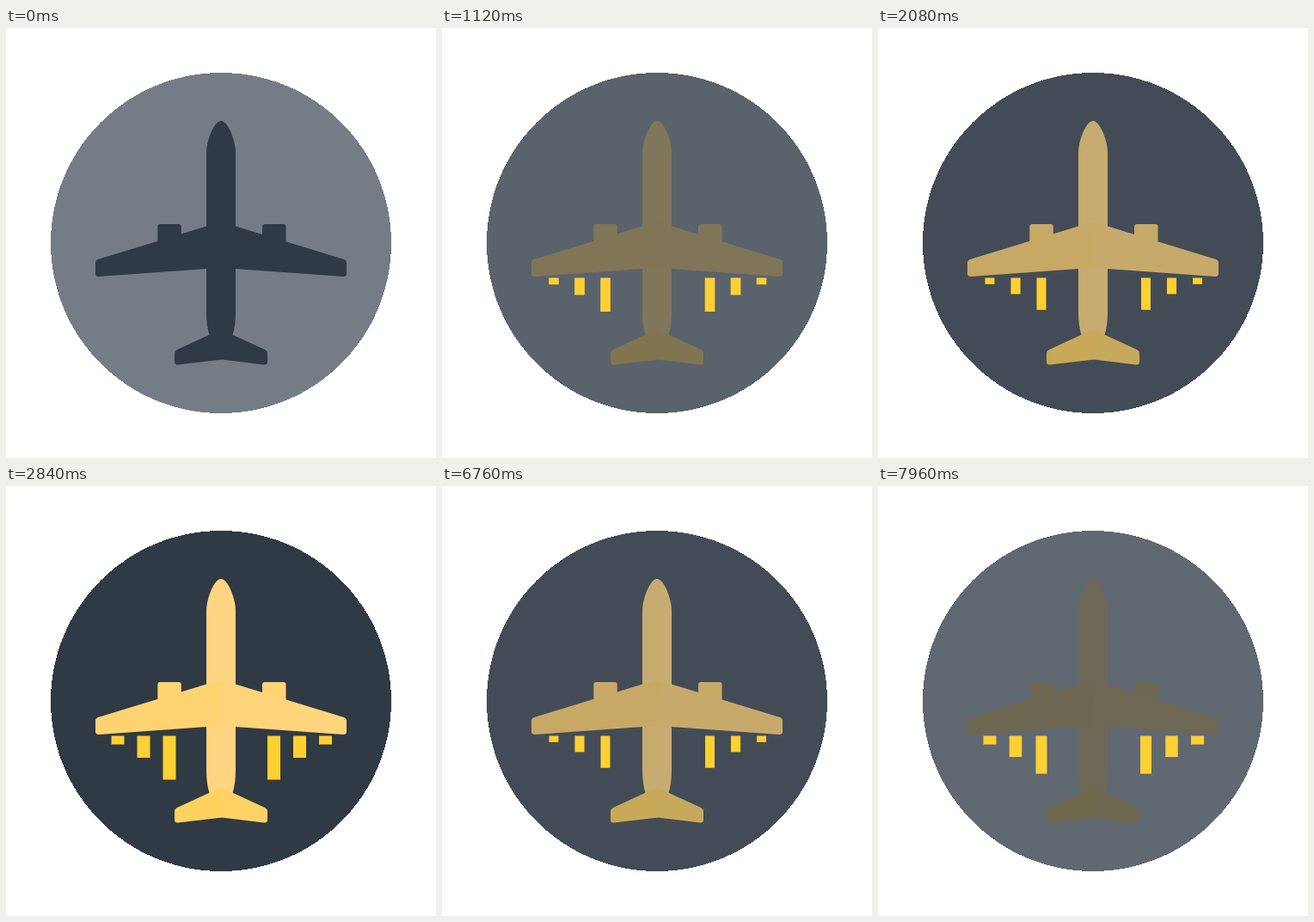
An HTML page for the animation above (8000 ms loop, 500 px wide and 500 px high).

```html
<!DOCTYPE html>
<html lang="en">
<head>
<meta charset="utf-8">
<title>Plane at night</title>
<style>
  html, body { margin: 0; width: 100%; height: 100%; overflow: hidden; background: #fff; }
  svg { display: block; width: 100%; height: 100%; }
</style>
</head>
<body>
<svg viewBox="0 0 500 500">
  <circle id="sky" cx="250" cy="250" r="198" shape-rendering="crispEdges"/>
  <g id="bars" fill="#ffd033"></g>
  <g id="plane"></g>
</svg>
<script>
const LOOP = 8000, STEP = 40, FADE = 2800, CYCLE = FADE / 3;
const NIGHT = [48, 58, 68], DAY = [117, 124, 133];

const wing = 'M104 273Q104 270 107 269L233 230.5L253 225L247 279L233 280L108 289Q104 289 104 286Z';
const wingRight = 'M396 273Q396 270 393 269L267 230.5L250 225.5L246 279L267 280L392 289Q396 289 396 286Z';
const engine = x => `M${x} 255V231Q${x} 228 ${x + 3} 228H${x + 24.5}Q${x + 27.5} 228 ${x + 27.5} 231V255Z`;
const tail = 'M251 350L199 374Q196 375.5 196 378V388Q196 392 200 391.5L251 385.5Z';
const tailRight = 'M249 350L301 374Q304 375.5 304 378V388Q304 392 300 391.5L249 385.3Z';
const body = 'M250 108C258 108 267 131 267 145V330Q267 346 263.5 357L250 364L236.5 357Q233 346 233 330V145C233 131 242 108 250 108Z';

// outline and lit colour, back to front
const parts = [
  [body, [255, 213, 130]],
  [engine(298), [255, 212, 116]],
  [wingRight, [255, 212, 122]],
  [engine(176.3), [255, 211, 113]],
  [wing, [255, 211, 113]],
  [tailRight, [255, 210, 102]],
  [tail, [255, 210, 95]]
];

// height, left and right centre, [cycle position, scale] keys
const lights = [
  { h: 51, xs: [190, 311.5], keys: [[0, 1], [.186, .73], [.35, .7], [.543, .785], [.643, .82], [.9, .865], [1, 1]] },
  { h: 25.5, xs: [160, 341.5], keys: [[0, 1], [.186, .74], [.35, .71], [.543, .805], [.643, .8], [.9, .965], [1, 1]] },
  { h: 10, xs: [130, 371.5], keys: [[0, 1], [.186, .73], [.35, .71], [.543, .82], [.643, .81], [.86, 1], [1, 1]] }
];

const byId = id => document.getElementById(id);
const add = (parent, tag) =>
  parent.appendChild(document.createElementNS('http://www.w3.org/2000/svg', tag));
const lerp = (a, b, k) => a + (b - a) * k;
const mix = (a, b, k) => `rgb(${a.map((v, i) => Math.round(lerp(v, b[i], k)))})`;

function sample(keys, x) {
  const i = Math.max(1, keys.findIndex(k => k[0] >= x));
  const [x0, y0] = keys[i - 1], [x1, y1] = keys[i];
  return lerp(y0, y1, (x - x0) / (x1 - x0));
}

const shapes = parts.map(([d, lit]) => {
  const el = add(byId('plane'), 'path');
  el.setAttribute('d', d);
  return { el, lit };
});
for (const light of lights) light.els = light.xs.map(() => add(byId('bars'), 'rect'));

// Fades in, holds, then runs back the same way.
function position(t) {
  if (t < 80) return 0;
  if (t < 6000) return Math.min(FADE, t - 40);
  return FADE - (t - 6000);
}

function draw(time) {
  const t = Math.floor((time % LOOP) / STEP) * STEP;
  const pos = position(t), p = pos / FADE;
  byId('sky').setAttribute('fill', mix(DAY, NIGHT, p));
  for (const { el, lit } of shapes) el.setAttribute('fill', mix(NIGHT, lit, p));

  byId('bars').setAttribute('visibility', pos ? 'visible' : 'hidden');
  const phase = pos === FADE ? 1 : (pos % CYCLE) / CYCLE;
  for (const { h, xs, keys, els } of lights) {
    const s = sample(keys, phase);
    els.forEach((el, i) => {
      el.setAttribute('x', xs[i] - 7.5 * s);
      el.setAttribute('y', 290.5);
      el.setAttribute('width', 15 * s);
      el.setAttribute('height', h * s);
    });
  }
}

const start = performance.now();
function tick() {
  draw(performance.now() - start);
  requestAnimationFrame(tick);
}
tick();
</script>
</body>
</html>
```
